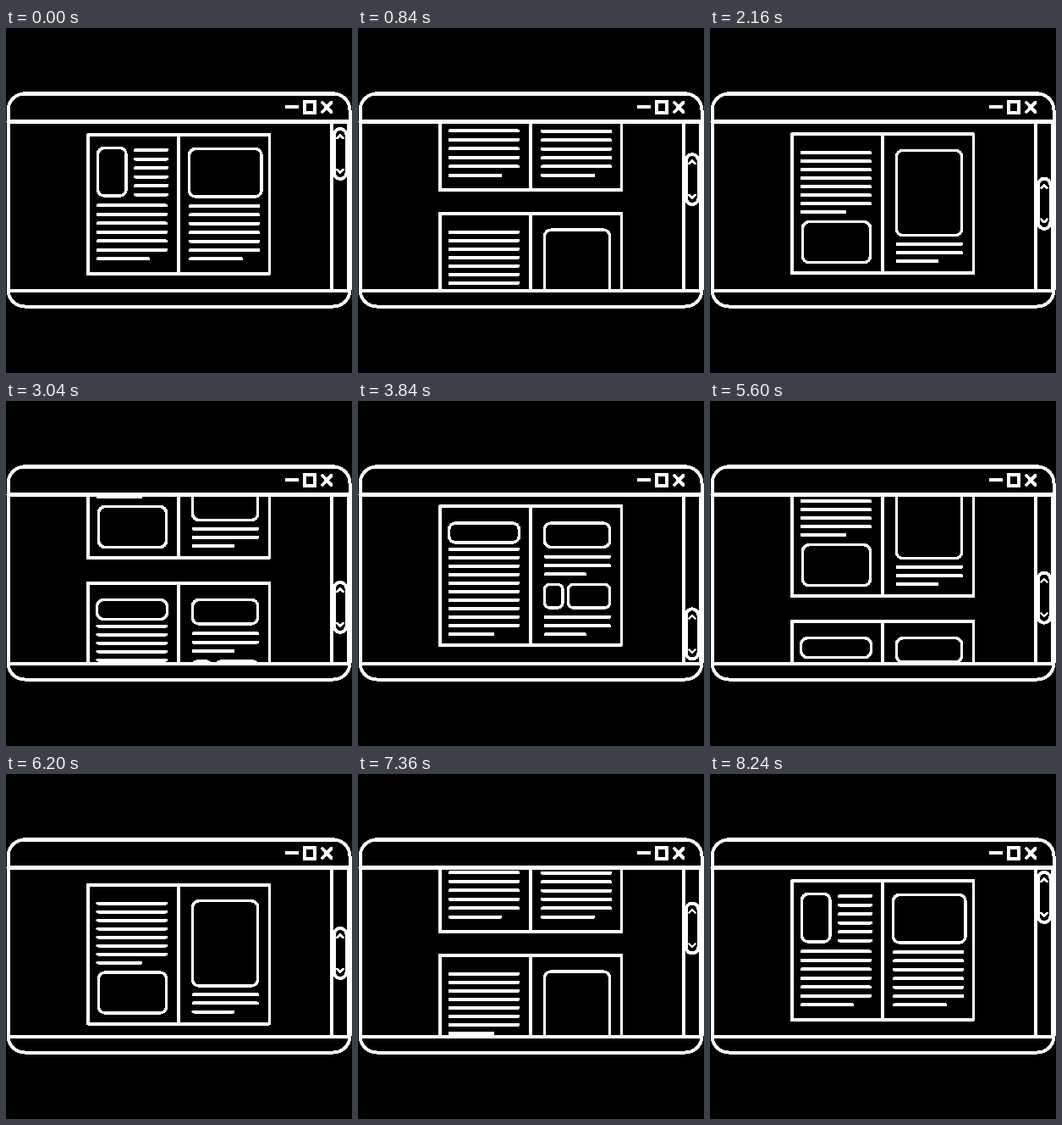
Write an HTML page that moves like this. It is 409 by 407 pixels and loops after 8960 ms.

```html
<!DOCTYPE html>
<html lang="en">
<head>
<meta charset="utf-8">
<title>Scrolling pages</title>
<style>
  html, body { margin: 0; width: 100%; height: 100%; overflow: hidden; background: #000; }
  svg { display: block; width: 409px; height: 407px; }
  svg * { shape-rendering: crispEdges; }
</style>
</head>
<body>
<svg viewBox="0 0 409 407" fill="none" stroke="#fff" stroke-width="4" stroke-linecap="round" stroke-linejoin="round">
  <defs>
    <clipPath id="view"><rect x="0" y="111" width="409" height="199"/></clipPath>
  </defs>
  <g clip-path="url(#view)">
    <g id="pages"></g>
    <g id="thumb">
      <rect x="387.7" y="0" width="14.8" height="59" rx="7.4"/>
      <path d="M391.5 11l3.5-3.5 3.5 3.5M391.5 48l3.5 3.5 3.5-3.5" stroke-width="2.5"/>
    </g>
  </g>
  <rect x="2.5" y="77.5" width="404" height="251" rx="19.5"/>
  <path d="M22 77.5H387M3 110.5H406" stroke-width="5"/>
  <path d="M3 310H406M385 112V309M405 112V309"/>
  <path d="M331.5 93H344.5M374 88L384.5 99M384.5 88L374 99"/>
  <rect x="353" y="87" width="12" height="13" stroke-linejoin="miter"/>
</svg>
<script>
const LOOP = 8960;
const pages = document.getElementById('pages');
const thumb = document.getElementById('thumb');

// [time, top of first page, top of scroll thumb]
const KEYS = [
  [0, 126, 119],
  [1620, -64, 177],
  [2140, -64, 177],
  [3805, -261, 245.3],
  [4360, -261, 245.3],
  [4400, -254, 244],
  [6200, -61, 182],
  [6660, -61, 182],
  [8230, 126, 116],
  [LOOP, 126, 116]
];

const box = (x1, y1, x2, y2, r = 7.5) =>
  `<rect x="${x1}" y="${y1}" width="${x2 - x1}" height="${y2 - y1}" rx="${r}" stroke-width="3.5"/>`;

// Evenly spaced text lines; the last one ends at lastX.
function lines(x1, x2, y, gap, count, lastX = x2) {
  let d = '';
  for (let i = 0; i < count; i++) {
    d += `M${x1} ${y + i * gap}H${i === count - 1 ? lastX : x2}`;
  }
  return `<path d="${d}"/>`;
}

const page = (y, content) =>
  `<g transform="translate(0 ${y})"><path d="M311 0H97V164H311M204 0V164"/>` +
  `<path d="M311.5 0V164" stroke-width="3"/>${content}</g>`;

pages.innerHTML =
  page(0,
    box(108.5, 15.5, 142, 72) +
    lines(153, 190, 18, 10.5, 6) +
    lines(108.5, 189, 83.4, 10.5, 7, 168.5) +
    box(216.5, 16.5, 302, 73) +
    lines(218, 298.5, 84, 10.4, 7, 278.5)) +
  page(191.5,
    lines(108.5, 189, 22, 10, 8, 159.5) +
    box(109.5, 103.5, 189.5, 151.5) +
    box(220.5, 19.2, 297.6, 119.5) +
    lines(221.5, 297, 129.8, 10.1, 3, 268.5)) +
  page(385,
    box(107.5, 20, 190.5, 43, 8) +
    lines(108.5, 189, 51, 10, 11, 159.5) +
    box(220.5, 20, 297.6, 48.4) +
    lines(221.5, 297, 59.8, 10.3, 3, 268.5) +
    box(220.5, 92.4, 242, 120, 6) +
    box(248.5, 92.4, 297.6, 120, 6) +
    lines(221.5, 297, 131, 10.1, 3, 268.5));

function render(t) {
  const i = KEYS.findIndex(key => t < key[0]);
  const [t0, y0, s0] = KEYS[i - 1];
  const [t1, y1, s1] = KEYS[i];
  const p = (t - t0) / (t1 - t0);
  pages.setAttribute('transform', `translate(0 ${y0 + (y1 - y0) * p})`);
  thumb.setAttribute('transform', `translate(0 ${s0 + (s1 - s0) * p})`);
}

const start = performance.now();
function tick() {
  const t = (performance.now() - start) % LOOP;
  render(Math.floor(t / 40) * 40);
  requestAnimationFrame(tick);
}
tick();
</script>
</body>
</html>
```
